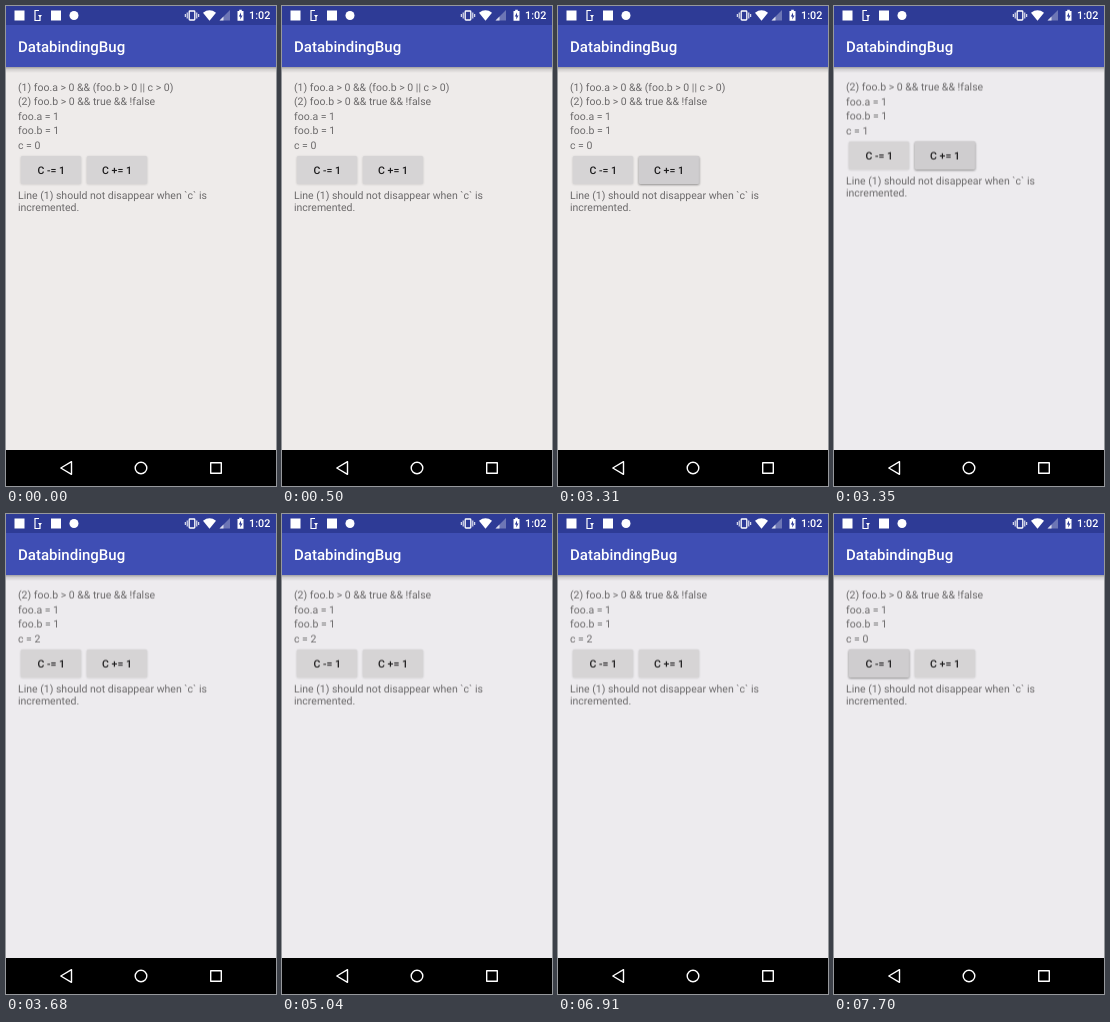
These frames come from a looping animation (270x480 px, 8 s). An HTML page:

```html
<!DOCTYPE html>
<html lang="en">
<head>
<meta charset="utf-8">
<title>DatabindingBug</title>
<style>
html, body { margin: 0; width: 100%; height: 100%; overflow: hidden; background: #000; }
svg { display: block; width: 100%; height: 100%; font: 10.5px Roboto, sans-serif; text-rendering: geometricPrecision; }
.bg { fill: #eeebea; animation: tint 8s step-end infinite; }
.body { fill: #6c6a6b; }
.title { font-size: 15px; font-weight: 500; fill: #fff; }
.label { font-weight: 500; fill: #1c1b1c; text-anchor: middle; }
.clock { font-weight: 500; font-size: 10.8px; fill: #fff; text-anchor: end; }
.line { fill: none; stroke: #fff; }

.first { animation: vanish 8s step-end infinite; }
.rest { animation: lift 8s step-end infinite; }
.zero { animation: zero 8s step-end infinite; }
.one { animation: one 8s step-end infinite; }
.two { animation: two 8s step-end infinite; }
.plus { animation: plus 8s linear infinite; }
.minus { animation: minus 8s linear infinite; }

@keyframes tint { 0% { fill: #eeebea; } 41.87%, 100% { fill: #edebee; } }
@keyframes vanish { 0% { opacity: 1; } 41.87%, 100% { opacity: 0; } }
@keyframes lift { 0% { transform: none; } 41.87%, 100% { transform: translateY(-14.5px); } }
@keyframes zero { 0% { opacity: 1; } 41.87% { opacity: 0; } 94%, 100% { opacity: 1; } }
@keyframes one { 0% { opacity: 0; } 41.87% { opacity: 1; } 44.5% { opacity: 0; } 87.5% { opacity: 1; } 94%, 100% { opacity: 0; } }
@keyframes two { 0% { opacity: 0; } 44.5% { opacity: 1; } 87.5%, 100% { opacity: 0; } }
@keyframes plus { 0%, 38.9% { opacity: 0; } 39% { opacity: .15; } 41.3%, 44% { opacity: 1; } 46%, 100% { opacity: 0; } }
@keyframes minus { 0%, 86.4% { opacity: 0; } 87.5% { opacity: .6; } 88.8%, 91.5% { opacity: .4; } 91.7%, 100% { opacity: 1; } }
</style>
</head>
<body>
<svg viewBox="0 0 270 480">
  <defs>
    <linearGradient id="shade" x2="0" y2="1">
      <stop offset="0" stop-color="#000" stop-opacity=".32"/>
      <stop offset=".4" stop-color="#000" stop-opacity=".12"/>
      <stop offset="1" stop-color="#000" stop-opacity="0"/>
    </linearGradient>
    <filter id="soft" x="-20%" y="-40%" width="140%" height="180%">
      <feGaussianBlur stdDeviation="1.1"/>
    </filter>
    <rect id="key" width="60.5" height="28" rx="1.5"/>
    <g id="pressed">
      <use href="#key" y="1" fill="#000" opacity=".32" filter="url(#soft)"/>
      <use href="#key" fill="#cfcdcf"/>
    </g>
  </defs>

  <rect class="bg" width="270" height="480"/>
  <rect y="61" width="270" height="6" fill="url(#shade)"/>
  <rect width="270" height="61" fill="#3f4eb4"/>
  <rect width="270" height="19" fill="#2e3b96"/>
  <text class="title" x="12" y="45.6">DatabindingBug</text>

  <!-- status bar -->
  <g fill="#fff">
    <rect x="8.5" y="4.5" width="10" height="10"/>
    <rect x="45" y="4.5" width="10" height="10"/>
    <circle cx="68" cy="9.5" r="4.5"/>
    <path d="M34 10v4.5h-5V4.5h4" fill="none" stroke="#fff" stroke-width="1.2"/>
    <path d="M32 9h4l-2 2.5z"/>
    <rect x="183.2" y="5" width="5.6" height="9" rx=".8" fill="none" stroke="#fff" stroke-width="1.3"/>
    <path class="line" d="M181.2 6.5v6M179.3 8v3M190.8 6.5v6M192.7 8v3"/>
    <path d="M197 6.7Q203.5 1.800 210 6.700L203.5 14.700z"/>
    <path d="M224 4v10.500H213.500z" opacity=".3"/>
    <path d="M217.500 10.500v4h-4z" opacity=".75"/>
    <path d="M233.200 3.800h2.600v1.200h1.700v9.700h-6V5h1.700z"/>
    <path d="M235 6.500l-2.200 4h1.500v3l2.200-4H235z" fill="#2e3b96"/>
  </g>
  <text class="clock" x="264.300" y="13.300">1:02</text>

  <!-- content -->
  <g class="body">
    <text class="first" x="12" y="84.800">(1) foo.a &gt; 0 &amp;&amp; (foo.b &gt; 0 || c &gt; 0)</text>
    <g class="rest">
      <text x="12" y="99.300">(2) foo.b &gt; 0 &amp;&amp; true &amp;&amp; !false</text>
      <text x="12" y="113.800">foo.a = 1</text>
      <text x="12" y="128.300">foo.b = 1</text>
      <text class="zero" x="12" y="142.800">c = 0</text>
      <text class="one" x="12" y="142.800">c = 1</text>
      <text class="two" x="12" y="142.800">c = 2</text>
      <g transform="translate(14.700 150)">
        <use href="#key" y=".5" fill="#000" opacity=".14" filter="url(#soft)"/>
        <use href="#key" fill="#d6d4d5"/>
        <g class="minus"><use href="#pressed"/></g>
        <text class="label" x="30.500" y="17.700">C -= 1</text>
      </g>
      <g transform="translate(80.700 150)">
        <use href="#key" y=".5" fill="#000" opacity=".14" filter="url(#soft)"/>
        <use href="#key" fill="#d6d4d5"/>
        <g class="plus"><use href="#pressed"/></g>
        <text class="label" x="30.300" y="17.700">C += 1</text>
      </g>
      <text x="12" y="192.900">Line (1) should not disappear when `c` is</text>
      <text x="12" y="205.100">incremented.</text>
    </g>
  </g>

  <!-- navigation bar -->
  <rect y="444" width="270" height="36"/>
  <g class="line" stroke-width="1.4" stroke-linejoin="round">
    <path d="M54.800 462l10.700-6.300v12.600z"/>
    <circle cx="135" cy="462" r="5.800"/>
    <rect x="204.700" y="456.700" width="10.600" height="10.600"/>
  </g>
</svg>
</body>
</html>
```
